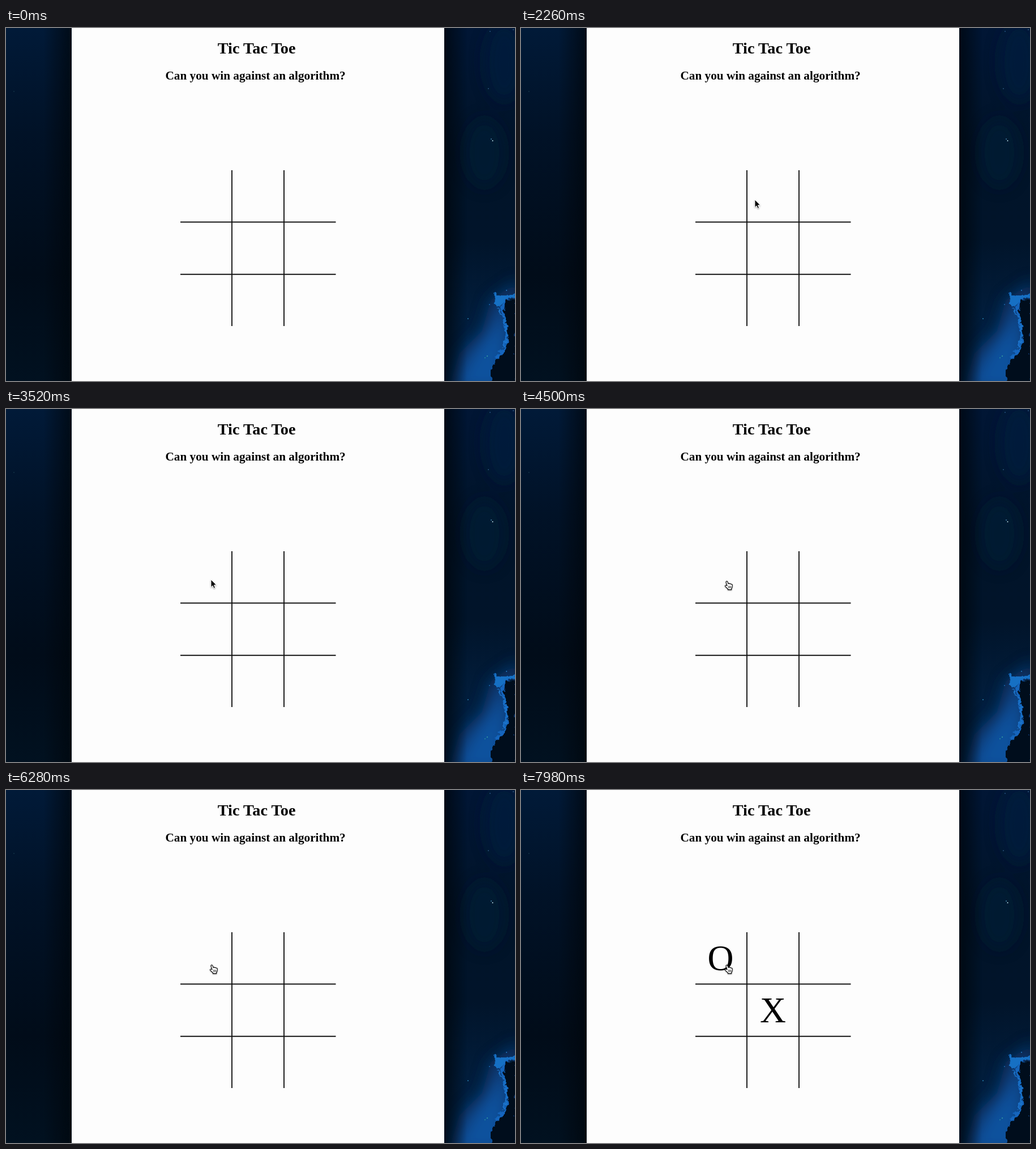
Recreate the animation shown at these times as an HTML page. Size 899 by 623 pixels, loop 8 s.

```html
<!DOCTYPE html>
<html lang="en">
<head>
<meta charset="utf-8">
<title>Tic Tac Toe</title>
<style>
  html, body { margin: 0; width: 100%; height: 100%; overflow: hidden; background: #010d1c; }
  svg { display: block; width: 100%; height: 100%; }
  text { font-family: "Liberation Serif", "Times New Roman", serif; }
  .heading { font-weight: bold; }
  .mark { font-size: 63.7px; text-anchor: middle; }
</style>
</head>
<body>
<svg viewBox="0 0 899 623" preserveAspectRatio="none">
  <defs>
    <linearGradient id="leftSky" x2="0" y2="1">
      <stop offset="0" stop-color="#011a38"/>
      <stop offset=".3" stop-color="#011227"/>
      <stop offset=".7" stop-color="#010c19"/>
      <stop offset="1" stop-color="#011120"/>
    </linearGradient>
    <linearGradient id="rightSky" x2="0" y2="1">
      <stop offset="0" stop-color="#011635"/>
      <stop offset=".35" stop-color="#011429"/>
      <stop offset=".6" stop-color="#01142a"/>
      <stop offset="1" stop-color="#02254b"/>
    </linearGradient>
    <linearGradient id="shade">
      <stop offset="0" stop-color="#00060c" stop-opacity="0"/>
      <stop offset="1" stop-color="#00060c" stop-opacity=".75"/>
    </linearGradient>
    <filter id="soft" x="-50%" y="-50%" width="200%" height="200%"><feGaussianBlur stdDeviation="13"/></filter>
    <filter id="ragged" x="-30%" y="-30%" width="160%" height="160%">
      <feTurbulence type="fractalNoise" baseFrequency=".11" numOctaves="3" seed="4"/>
      <feDisplacementMap in="SourceGraphic" scale="13" xChannelSelector="R" yChannelSelector="G"/>
      <feGaussianBlur stdDeviation=".6"/>
    </filter>
    <filter id="drop" x="-50%" y="-50%" width="220%" height="220%">
      <feDropShadow dx="0" dy="1" stdDeviation=".9" flood-opacity=".4"/>
    </filter>
  </defs>

  <rect width="116" height="623" fill="url(#leftSky)"/>
  <rect x="66" width="50" height="623" fill="url(#shade)"/>

  <rect x="774" width="125" height="623" fill="url(#rightSky)"/>
  <g filter="url(#soft)">
    <ellipse cx="880" cy="60" rx="35" ry="70" fill="#021d42" opacity=".6"/>
    <ellipse cx="845" cy="220" rx="35" ry="60" fill="#021c38" opacity=".6"/>
    <path d="M780 640L800 575 840 535 856 480 905 445V640Z" fill="#07396f"/>
    <path d="M790 640L825 575 862 525 880 490V640Z" fill="#0b519d"/>
  </g>
  <g filter="url(#ragged)">
    <path d="M900 481L884 480 879 494 883 520 887 543 882 568 866 587 858 604 858 630H900Z" fill="#020f1e"/>
    <path d="M899 475L882 478 876 492 881 520 885 543 881 566 865 583" fill="none" stroke="#1265bd" stroke-width="5"/>
    <path d="M862 469L874 473 899 470 898 477 880 480 872 491 864 484Z" fill="#176fc4"/>
    <path d="M870 496L881 519 885 542 879 564" fill="none" stroke="#1b75cb" stroke-width="2"/>
  </g>
  <g id="stars"></g>
  <rect x="774" width="40" height="623" fill="url(#shade)" transform="matrix(-1 0 0 1 1588 0)"/>

  <rect x="116" width="658" height="623" fill="#fdfdfd"/>
  <text class="heading" x="373.7" y="45" font-size="28.3">Tic Tac Toe</text>
  <text class="heading" x="281.5" y="91" font-size="21.25">Can you win against an algorithm?</text>
  <path d="M399 251V526M491 251V526M308 342.5H582.5M308 434.7H582.5" stroke="#151515" stroke-width="1.9"/>
  <g id="marks">
    <text class="mark" x="352.5" y="318">O</text>
    <text class="mark" x="445" y="410">X</text>
  </g>

  <g id="cursor" filter="url(#drop)">
    <path id="arrow" d="M0 0V13.6L3.1 10.8 5.1 15.5 7.5 14.5 5.5 9.8H9.8Z" fill="#000" stroke="#fff" stroke-width="1"/>
    <g id="hand" fill="#fff" stroke="#000" stroke-linejoin="round" stroke-linecap="round">
      <path d="M2.1 8.6L.1 2.4C-.5 .3 2.1 -.5 2.9 1.5L4.2 5.1C4.8 4 6.6 4.2 7 5.3 7.6 4.6 9 4.9 9.3 6 10.4 5.4 11.4 6.2 11.3 7.6L10.9 11.2 9.7 13.4V15.4H3.5V14.1L-.8 10.2C-2.4 8.5 -.9 6.9 .6 7.8Z" stroke-width="1.1"/>
      <path d="M4.6 9.2V12.3M6.5 9.2V12.3M8.4 9.2V12.3" stroke-width=".8"/>
    </g>
  </g>
</svg>
<script>
const LOOP = 8000, ENTER = 700, HAND = 4300, MOVE = 7500;
const byId = id => document.getElementById(id);
const show = (id, visible) => byId(id).style.display = visible ? "" : "none";

// [time, x, y] of the pointer tip
const route = [
  [ENTER, 532, 626], [1100, 495, 468], [2260, 413, 303], [2900, 362, 301],
  [4100, 362, 301], [4500, 362, 303.5], [5700, 362, 303.5], [6300, 362, 308.5], [LOOP, 362, 308.5]
];

const stars = [
  [859.5, 199, "#bfe3ed"], [857, 196, "#4583a5"], [852, 107, "#2b547b"], [855, 6, "#255080"],
  [896, 3, "#315b83"], [816, 513, "#2a83b5"], [850, 579, "#38a1a0"], [846, 582, "#258c9a"],
  [884, 463, "#247bc8"], [854, 488, "#1b67ad"], [14, 112, "#123346"]
];
byId("stars").innerHTML = stars.map(([x, y, color]) =>
  `<circle cx="${x}" cy="${y}" r="1" fill="${color}"/>`).join("");

function pointerAt(time) {
  const next = Math.max(1, route.findIndex(stop => stop[0] >= time));
  const [t0, x0, y0] = route[next - 1], [t1, x1, y1] = route[next];
  const p = Math.max(0, (time - t0) / (t1 - t0));
  const eased = p * p * (3 - 2 * p);
  return [x0 + (x1 - x0) * eased, y0 + (y1 - y0) * eased];
}

function draw(now) {
  const time = now % LOOP;
  const [x, y] = pointerAt(time);
  byId("cursor").setAttribute("transform", `translate(${x} ${y})`);
  show("cursor", time >= ENTER);
  show("arrow", time < HAND);
  show("hand", time >= HAND);
  show("marks", time >= MOVE);
  requestAnimationFrame(draw);
}
draw(performance.now());
</script>
</body>
</html>
```
